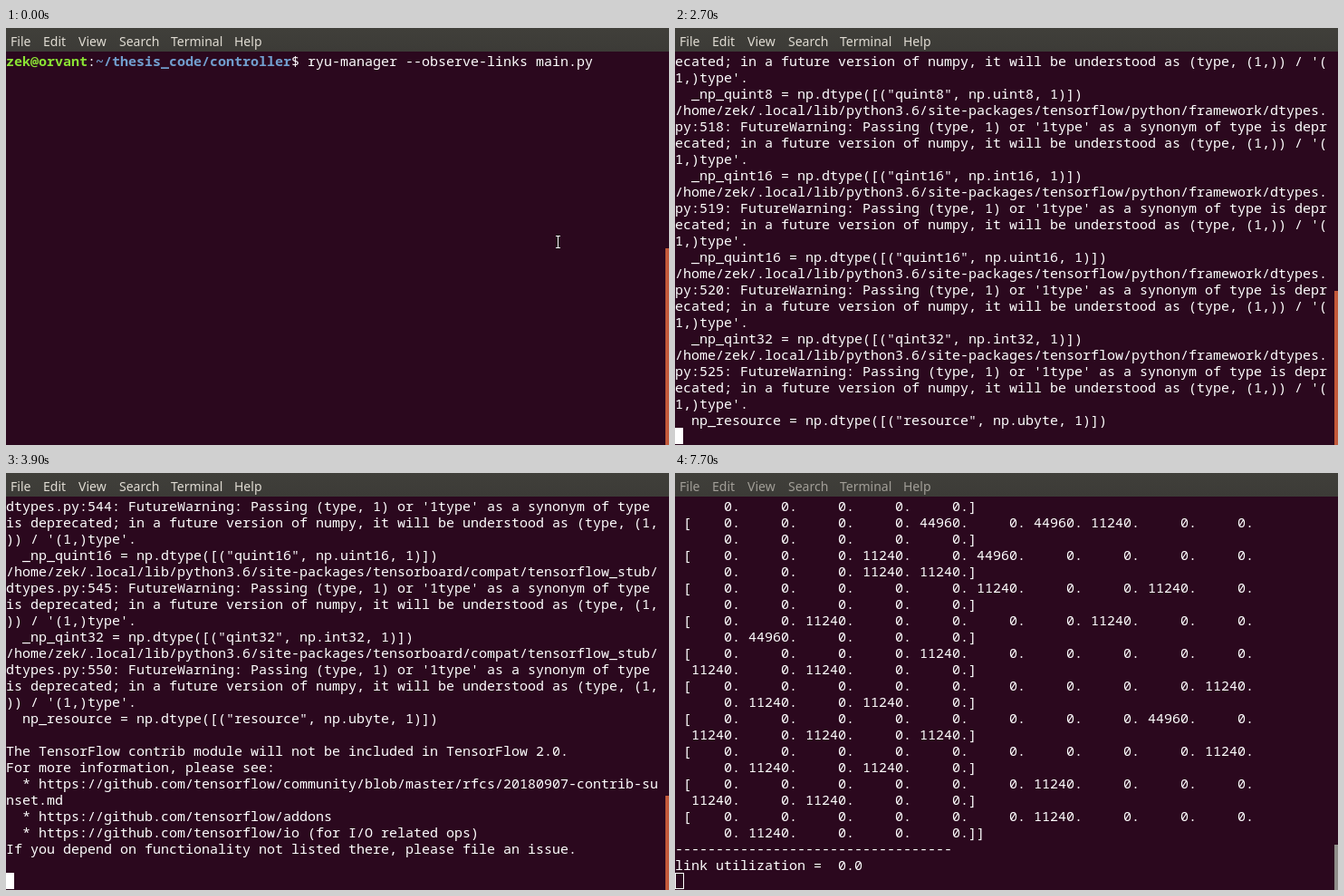
An HTML page for the animation above (7.8 s loop, 732 by 460 pixels).

```html
<!DOCTYPE html>
<html lang="en">
<head>
<meta charset="utf-8">
<title>Terminal session</title>
<style>
  html, body { margin: 0; width: 100%; height: 100%; overflow: hidden; background: #2b081e; }
  #stage { position: relative; width: 732px; height: 460px; overflow: hidden; background: #2b081e; }
  #stage > * { position: absolute; }
  #menu { left: 0; top: 0; width: 732px; height: 26px; background: linear-gradient(#403f3a, #3c3b37);
    color: #dfdbd2; font: 14px/26px "Noto Sans", "Open Sans", sans-serif; }
  #menu span { position: absolute; top: 2px; white-space: pre; }
  pre { left: 0; top: 27px; margin: 0; color: #fff; font: 15px/18px "Noto Sans Mono", monospace;
    font-variant-ligatures: none; }
  pre b { color: #8ae234; }
  pre b + b { color: #729fcf; }
  #caret { width: 9px; height: 18px; box-sizing: border-box; background: #fff; }
  #caret.hollow { background: none; border: 1px solid #fff; width: 10px; }
  #thumb { right: 0; bottom: 0; width: 4px; background: #c3593a; }
  svg { left: 0; top: 0; overflow: visible; }
</style>
</head>
<body>
<div id="stage">
  <div id="menu"></div>
  <pre id="prompt"><b>zek@orvant</b>:<b>~/thesis_code/controller</b>$ ryu-manager --observe-links main.py</pre>
  <pre id="log"></pre>
  <div id="caret"></div>
  <div id="thumb"></div>
  <svg width="732" height="460">
    <g id="beam" fill="none">
      <path d="M-3 -6.5H2M-.5 -6V6M-3 6.5H2" stroke="#000" stroke-width="2.4" opacity=".5"/>
      <path d="M-3 -6.5H2M-.5 -6V6M-3 6.5H2" stroke="#fff"/>
    </g>
    <path id="arrow" d="M.5 .5V16.2L4.2 12.8L6.6 18.6L9.2 17.5L6.8 11.8H11.8Z" fill="#fff" stroke="#000"/>
  </svg>
</div>
<script>
const LOOP = 7800, ROWS = 23, COLS = 80;
const $ = id => document.getElementById(id);

const menuItems = { File: 5, Edit: 41, View: 80, Search: 125, Terminal: 182, Help: 252 };
for (const [label, x] of Object.entries(menuItems)) {
  const item = document.createElement('span');
  item.textContent = label;
  item.style.left = x + 'px';
  $('menu').append(item);
}

// Hard-wrap at the terminal width and keep the last rows.
const wrap = text => text.split('\n').flatMap(line => line.match(new RegExp(`.{1,${COLS}}`, 'g')) || ['']);
const tail = text => wrap(text).slice(-ROWS).join('\n');

const types = ['qint8', 'quint8', 'qint16', 'quint16', 'qint32', 'resource'];
const warnings = (path, firstLine) => types.map((type, i) => {
  const last = type === 'resource';
  const line = firstLine + i + (last ? 4 : 0);
  const name = (last ? 'np_' : '_np_') + type;
  const base = last ? 'ubyte' : type.replace('q', '');
  return `/home/zek/.local/lib/python3.6/site-packages/${path}/dtypes.py:${line}: FutureWarning: ` +
    `Passing (type, 1) or '1type' as a synonym of type is deprecated; in a future version of numpy, ` +
    `it will be understood as (type, (1,)) / '(1,)type'.\n  ${name} = np.dtype([("${type}", np.${base}, 1)])`;
}).join('\n');

const stubWarnings = warnings('tensorboard/compat/tensorflow_stub', 541);
const notice = `

The TensorFlow contrib module will not be included in TensorFlow 2.0.
For more information, please see:
  * https://github.com/tensorflow/community/blob/master/rfcs/20180907-contrib-sunset.md
  * https://github.com/tensorflow/addons
  * https://github.com/tensorflow/io (for I/O related ops)
If you depend on functionality not listed there, please file an issue.
`;

// Link loads, one digit per cell, in units of 11240.
const loads = ['000000000000000', '000040410000000', '000104000000011', '000001001000000',
  '001000010004000', '000010000010100', '000000000101010', '000000004010101',
  '000000000101010', '000000100010100', '000000100001000'];
const cells = digits => [...digits].map(d => (d * 11240 + '.').padStart(6)).join(' ');
const matrix = loads.map(row => ` [${cells(row.slice(0, 10))}\n  ${cells(row.slice(10))}]`).join('\n') +
  `]\n${'-'.repeat(34)}\nlink utilization =  0.0`;

const vcs = name => '\nRegistered VCS backend: ' + name;
const backends = vcs('git') + vcs('hg') + vcs('svn') + vcs('bzr');

const end = [0, 23];
const steps = [
  [0, { log: '', prompt: true, caret: null, beam: [610, 236], arrow: null, thumb: 243, tint: '#c3593a', ink: '#dfdbd2', hollow: false }],
  [600, { caret: [73, 0] }],
  [1200, { caret: null }],
  [1300, { caret: [73, 0], beam: null }],
  [1500, { caret: [0, 1] }],
  [1900, { caret: null }],
  [2000, { log: vcs('git') }],
  [2200, { log: backends }],
  [2500, { log: backends + '\nloading app main.py' }],
  [2700, { log: tail(warnings('tensorflow/python/framework', 516)), prompt: false, caret: end, thumb: 290 }],
  [3100, { caret: null }],
  [3200, { beam: [646, 236] }],
  [3300, { beam: [604, 236] }],
  [3500, { beam: [400, 150] }],
  [3600, { beam: [180, 70], log: tail(stubWarnings), thumb: 346 }],
  [3700, { beam: null, arrow: [34, 6], caret: end }],
  [3900, { arrow: null, log: tail(stubWarnings + notice), thumb: 356 }],
  [4300, { caret: null }],
  [4500, { log: tail(matrix), thumb: 394 }],
  [4900, { caret: end }],
  [6000, { caret: null }],
  [6100, { caret: end }],
  [6400, { thumb: 410 }],
  [6700, { caret: null }],
  [7300, { caret: end }],
  [7600, { hollow: true, tint: '#a8775f', ink: '#bfbbb3' }],
  [7700, { tint: '#8f8d89', ink: '#a19e97' }]
];

// Each step inherits whatever it does not change.
let state = {};
const states = steps.map(([at, change]) => ({ at, ...(state = { ...state, ...change }) }));

const show = (el, on) => { el.style.visibility = on ? 'visible' : 'hidden'; };
const place = (id, pos) => {
  show($(id), pos);
  if (pos) $(id).setAttribute('transform', `translate(${pos})`);
};

function draw(s) {
  $('log').textContent = s.log;
  show($('prompt'), s.prompt);
  show($('caret'), s.caret);
  if (s.caret) {
    $('caret').style.left = s.caret[0] * 9 + 'px';
    $('caret').style.top = 27 + s.caret[1] * 18 + 'px';
  }
  $('caret').className = s.hollow ? 'hollow' : '';
  $('thumb').style.top = s.thumb + 'px';
  $('thumb').style.background = s.tint;
  $('menu').style.color = s.ink;
  place('beam', s.beam);
  place('arrow', s.arrow);
}

let shown;
const start = performance.now();
function tick() {
  const t = (performance.now() - start) % LOOP;
  const next = states.filter(s => s.at <= t).pop();
  if (next !== shown) draw(shown = next);
  requestAnimationFrame(tick);
}
tick();
</script>
</body>
</html>
```
